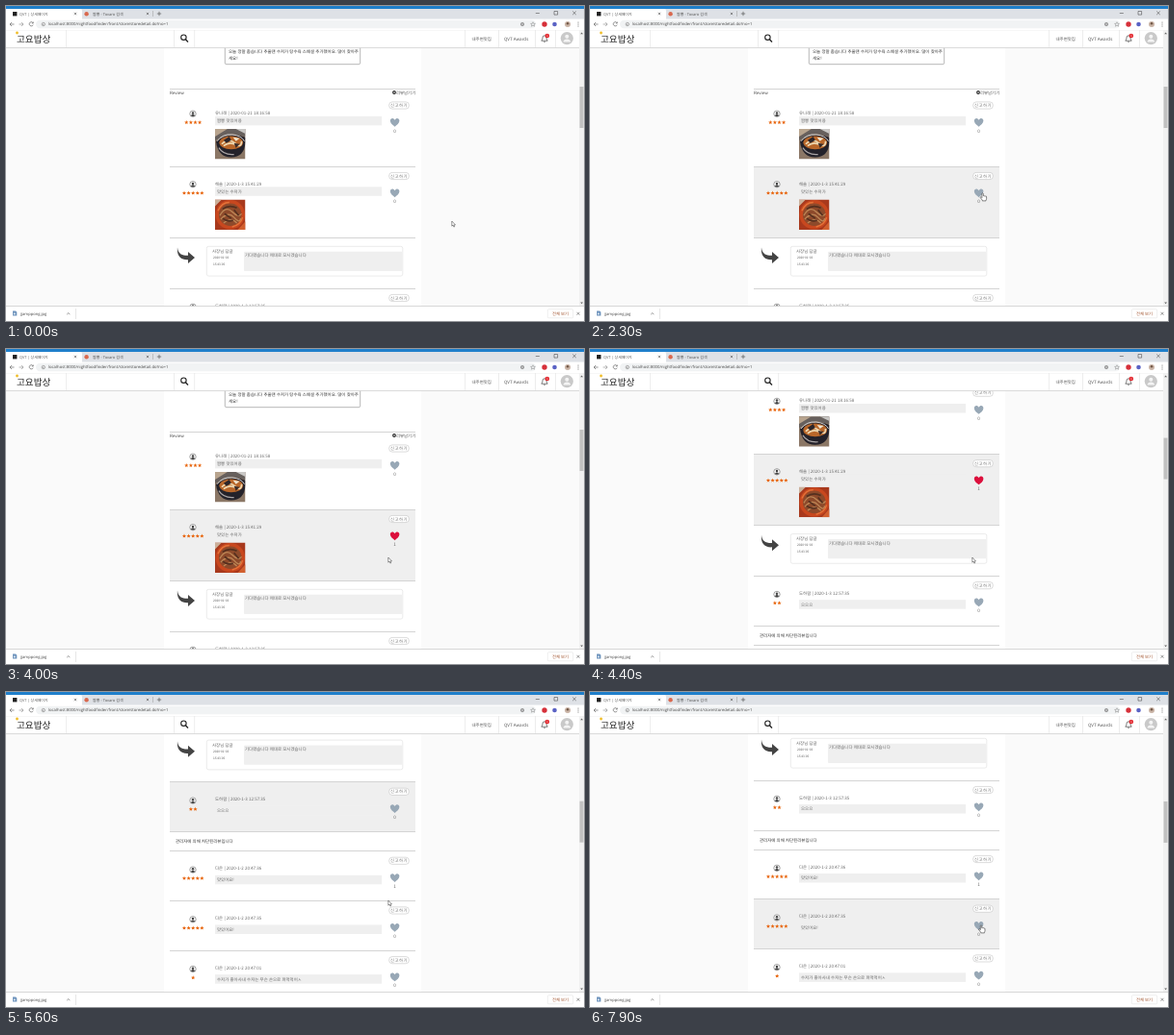
An HTML page for the animation above (8 s loop, 600x328 px).

```html
<!DOCTYPE html>
<html lang="ko">
<head>
<meta charset="utf-8">
<title>Review page</title>
<style>
  html, body { margin: 0; width: 100%; height: 100%; overflow: hidden; background: #fff; }
  svg { display: block; width: 600px; height: 328px; }
  svg svg { width: 31.5px; height: 31.5px; }
  text { font-family: "Noto Sans CJK KR", "Noto Sans CJK", "Noto Sans", sans-serif; white-space: pre; text-rendering: geometricPrecision; }
  .ui { font-family: "Open Sans", "Noto Sans CJK KR", "Noto Sans CJK", sans-serif; }
</style>
</head>
<body>
<svg id="stage" viewBox="0 0 600 328" xmlns="http://www.w3.org/2000/svg"></svg>
<script>
const LOOP = 8000;
const GREY = '#efefef', HEART = '#98a8b6', RED = '#dc0f3c';

const rect = (x, y, w, h, fill, extra = '') =>
  `<rect x="${x}" y="${y}" width="${w}" height="${h}" fill="${fill}" ${extra}/>`;
const circle = (x, y, r, fill, extra = '') =>
  `<circle cx="${x}" cy="${y}" r="${r}" fill="${fill}" ${extra}/>`;
const stroke = (d, color, width = 0.6, extra = '') =>
  `<path d="${d}" fill="none" stroke="${color}" stroke-width="${width}" ${extra}/>`;
const shape = (d, fill, extra = '') => `<path d="${d}" fill="${fill}" ${extra}/>`;
// y is the vertical middle of the line of text
const label = (x, y, str, size = 4.45, fill = '#666', extra = '') =>
  `<text x="${x}" y="${y + size * 0.37}" font-size="${size}" fill="${fill}" ${extra}>${str}</text>`;
const rule = y => rect(170, y - 0.5, 255, 1, '#d4d4d4', 'shape-rendering="crispEdges"');
const cross = (x, y, r, color, w = 0.6) =>
  stroke(`M${x - r} ${y - r}l${2 * r} ${2 * r}m0 ${-2 * r}l${-2 * r} ${2 * r}`, color, w);

const rows = [
  { y: 93.5, h: 73.5, who: '유나래', when: '2020-01-21 18:16:58', text: '짬뽕 맛있어용', stars: 4, photo: bowlPhoto },
  { y: 167, h: 74, who: '해솔', when: '2020-1-3 15:41:29', text: '맛있는 수저가', stars: 5, photo: soupPhoto, liked: true },
  { y: 294, h: 52, who: '도하람', when: '2020-1-3 12:57:35', text: '으으으', stars: 2 },
  { y: 366, h: 51.7, who: '다온', when: '2020-1-2 20:47:36', text: '맛있어요!', stars: 5, count: 1 },
  { y: 417.7, h: 51.7, who: '다온', when: '2020-1-2 20:47:35', text: '맛있어요!', stars: 5 },
  { y: 469.4, h: 52, who: '다온', when: '2020-1-2 20:47:01', text: '수저가 좋아사내 수저는 무슨 손으로 퍼먹먹어ㅅ', stars: 1 },
];

function star(cx, cy, r) {
  const pts = Array.from({ length: 10 }, (_, i) => {
    const a = i * Math.PI / 5, k = i % 2 ? r * 0.45 : r;
    return `${(cx + k * Math.sin(a)).toFixed(2)},${(cy - k * Math.cos(a)).toFixed(2)}`;
  });
  return `<polygon points="${pts.join(' ')}" fill="#e8650c"/>`;
}

const photo = (y, body) =>
  `<svg x="217" y="${y}" width="31.5" height="31.5" viewBox="0 0 32 32">${body}</svg>`;

function bowlPhoto(y) {
  return photo(y,
    rect(0, 0, 32, 32, '#8b7766') + shape('M0 0H32V8L18 5L0 12Z', '#67605d') +
    shape('M0 0H13L0 8Z', '#b8a48e') + shape('M22 0H32V5Z', '#c9c8c6') +
    shape('M1 13Q3 30 17 30T32 14V9Q17 2 1 13Z', '#24222a') +
    stroke('M2 13Q8 5 18 6T31 13', '#d7d5d4', 1) + stroke('M4 20Q9 28 20 27', '#a9a4a5', 1.2) +
    `<ellipse cx="17" cy="14.5" rx="12.5" ry="7" fill="#b9672a"/>` +
    stroke('M7 16Q14 9 21 15T28 13M9 18Q16 12 24 18', '#eed9b2', 1.7) +
    shape('M9 12L15 8L17 12L12 15Z', '#2c262a') + shape('M20 15L26 16L22 20Z', '#3a2924') +
    shape('M19 9L26 10L22 13Z', '#f1e6d0'));
}

function soupPhoto(y) {
  return photo(y,
    rect(0, 0, 32, 32, '#a8391d') + circle(16, 16, 15.5, '#c8481f') + circle(16, 16, 12, '#8d4a2b') +
    stroke('M5 17Q11 6 18 13T28 15M6 21Q14 12 20 19T27 20M9 25Q17 18 23 25', '#bd8756', 1.3) +
    stroke('M8 10Q15 5 23 9M10 15L17 20M20 11L25 17M8 20Q13 24 19 22', '#55301f', 1.7) +
    stroke('M3 12Q7 3 15 3M18 29Q27 27 29 19', '#e2743a', 1.4) +
    shape('M0 0H7L0 7Z', '#cbb09a') + shape('M24 32L32 23V32Z', '#d2602f'));
}

function user(x, y) {
  return circle(x, y, 3.2, '#fff', 'stroke="#666" stroke-width=".6"') +
    circle(x, y - 0.8, 1.25, '#444') + shape(`M${x - 2.2} ${y + 2.1}Q${x} ${y - 0.8} ${x + 2.2} ${y + 2.1}Q${x} ${y + 3.6} ${x - 2.2} ${y + 2.1}Z`, '#444');
}

function heart(x, y, id) {
  return shape(`M${x} ${y + 4.6}C${x - 2} ${y + 2.8} ${x - 4.8} ${y + 1} ${x - 4.8} ${y - 1.6}C${x - 4.8} ${y - 4.8} ${x - 1.2} ${y - 5} ${x} ${y - 2.4}C${x + 1.2} ${y - 5} ${x + 4.8} ${y - 4.8} ${x + 4.8} ${y - 1.6}C${x + 4.8} ${y + 1} ${x + 2} ${y + 2.8} ${x} ${y + 4.6}Z`, HEART, id);
}

function review(r) {
  const { y } = r, gap = r.photo ? 0 : 0.6;
  const boxY = y + (r.photo ? 21.3 : 25);
  let out = rule(y + r.h);
  out += user(194, y + 18.7 + gap);
  for (let i = 0; i < r.stars; i++) out += star(194.2 + (i - (r.stars - 1) / 2) * 4.6, y + 27.7 + gap, 2.2);
  out += label(217, y + 18, `${r.who} | ${r.when}`);
  out += rect(217, boxY, 173, 9.5, GREY) + label(219, boxY + 4.8, r.text);
  if (r.photo) out += r.photo(y + 34.5);
  out += rect(397.7, y + 6.4, 20.6, 7.2, '#fff', 'rx="3.2" stroke="#b8b8b8" stroke-width=".5"');
  out += label(408, y + 10, '신고하기', 4.4, '#777', 'text-anchor="middle" letter-spacing=".4"');
  out += heart(403.6, y + 27.6, r.liked ? 'id="heart"' : '');
  out += label(403.6, y + 36.5, r.count || 0, 4.6, '#666', 'text-anchor="middle"' + (r.liked ? ' id="count"' : ''));
  return out;
}

function pageContent() {
  return rect(227.3, 30, 140.4, 30.7, '#fff', 'rx="1.5" stroke="#888" stroke-width=".6"') +
    label(231, 47, '오늘 정말 춥습니다 추울땐 수저가 탕수육 스페셜 추가했어요. 많이 찾아주', 4.45, '#333') +
    label(231, 54, '세요!', 4.45, '#333') +
    rule(86.2) + label(170, 90, 'Review', 4.45, '#444') +
    circle(403, 90, 1.9, '#222') + stroke('M402 90h2m-1-1v2', '#fff', 0.5) +
    label(405, 90, '리뷰남기기', 4.4, '#555') +
    rows.map(review).join('') +
    shape('M178 251.5C178.5 257.5 182 260 189 259.8V256L196 262L189 268V264.2C181 264.6 177 259.5 178 251.5Z', '#444') +
    rect(208.3, 250.3, 203.5, 30.8, '#fff', 'rx="2" stroke="#ddd" stroke-width=".6"') +
    label(214, 255.5, '사장님 답글') +
    label(215, 262, '2020-01-03', 3.15, '#555') + label(215, 269, '15:43:05', 3.15, '#555') +
    rect(247, 255.8, 164.5, 20.2, GREY, 'rx="1"') +
    label(248, 259.8, '기다렸습니다 제대로 모시겠습니다') +
    rule(294) + label(176, 356, '관리자에 의해 차단된리뷰입니다', 4.45, '#333') + rule(366);
}

function browserTop() {
  return rect(0, 0, 600, 14, '#dee1e6') + rect(0, 0, 600, 3, '#1f7fcb') +
    shape('M0 14V3H77Q79 3 79 5V14Z', '#fff') + rect(7, 6, 4.4, 4.4, '#222') +
    label(14, 8.2, 'QVT | 상세페이지', 3.9, '#555', 'class="ui"') + cross(72, 8, 1.2, '#555') +
    circle(83.6, 8.2, 2.2, '#d9694f') +
    label(90, 8.2, '짬뽕 - Tovaro 검색', 4, '#555', 'class="ui"') + cross(147, 8, 1.2, '#555') +
    rect(152, 5, 0.5, 6, '#999') + stroke('M156.8 8h4.4m-2.2-2.2v4.4', '#444') +
    stroke('M549.8 7.5h4M569 5.5h3.6v3.6H569Z', '#333', 0.5) + cross(590, 7.3, 1.8, '#333', 0.5) +
    rect(0, 13.5, 600, 11.5, '#fff') + rect(31, 14.8, 519, 8.4, '#f1f3f4', 'rx="4.2"') +
    stroke('M8.5 19H4m2-2l-2 2l2 2', '#555') + stroke('M13.5 19H18m-2-2l2 2l-2 2', '#888') +
    stroke('M28 17.6A2.1 2.1 0 1 0 28.2 19.6M28.3 16.5v1.5h-1.6', '#555') +
    circle(38.8, 19, 1.7, 'none', 'stroke="#666" stroke-width=".5"') + rect(38.5, 18.7, 0.6, 1.3, '#666') +
    label(44, 18.8, 'localhost:8000/nightfoodfinder/front/store/storedetail.do?no=1', 4.24, '#444', 'class="ui"') +
    circle(536, 19, 1.7, 'none', 'stroke="#666" stroke-width=".6"') + stroke('M535 19h2m-1-1v2', '#666', 0.5) +
    stroke('M547 16.7l.7 1.6l1.7.1l-1.3 1.1l.5 1.7l-1.6-1l-1.6 1l.5-1.7l-1.3-1.1l1.7-.1Z', '#666', 0.4) +
    circle(559, 19, 2.7, '#d6303a') + circle(569.5, 19, 2.3, '#5a62c4') +
    circle(583, 19, 3, '#c9b3a5') + circle(583, 18.2, 1.2, '#715746') +
    [17, 19, 21].map(y => circle(594, y, 0.5, '#555')).join('');
}

function siteHeader() {
  const dividers = [62.3, 174, 195.5, 476.3, 511, 549, 570].map(x => rect(x, 25, 0.6, 18, '#e2e2e2')).join('');
  return rect(0, 25, 595, 18.5, '#fff') + rect(0, 24.6, 600, 0.6, '#d5d5d5') + rect(0, 43, 595, 0.8, '#d2d2d2') + dividers +
    circle(11.5, 28, 1.4, '#f0bd28') +
    label(11, 34.5, '고요밥상', 9.6, '#222', 'font-weight="500"') +
    circle(184.4, 32.7, 2.7, 'none', 'stroke="#222" stroke-width="1.1"') + stroke('M186.4 34.7l2.6 2.8', '#222', 1.3) +
    label(483.5, 34, '내주변맛집', 4.45, '#555') + label(517, 34, 'QVT Awards', 4.5, '#555') +
    stroke('M555.8 36.2Q557 35 557 33Q557 30.8 559 30.8T561 33Q561 35 562.2 36.2ZM558.2 37.3h1.6', '#444', 0.7) +
    circle(561.8, 31, 2.3, '#e3242b') + label(561.8, 31, '1', 3.2, '#fff', 'text-anchor="middle"') +
    circle(582.3, 33.6, 6.6, '#c9c9c9') + circle(582.3, 31.7, 2, '#f4f4f4') +
    shape('M578.5 37.6Q578.8 34.4 582.3 34.4T586.1 37.6Z', '#f4f4f4');
}

function browserBottom() {
  return rect(0, 312.3, 600, 15.7, '#fff') + rect(0, 312.2, 600, 0.7, '#c8c8c8') +
    shape('M7 317.5h3l1.3 1.3v3.7H7Z', '#6f94bd') + circle(8.8, 320.5, 0.9, '#e4edf5') +
    label(15, 320.7, 'jjamppong.jpg', 4.1, '#444', 'class="ui"') +
    stroke('M63.2 321.2l1.6-1.6l1.6 1.6', '#555') + rect(72, 315, 0.5, 11, '#ccc') +
    rect(562.3, 315.8, 26.4, 9, '#fff', 'rx="1" stroke="#ddd" stroke-width=".5"') +
    label(575.5, 320.3, '전체 보기', 4.3, '#a0522d', 'text-anchor="middle"') + cross(594, 320.3, 1.5, '#555');
}

const stage = document.getElementById('stage');
stage.innerHTML =
  rect(0, 0, 600, 328, '#fafafa') + rect(164, 25, 267, 290, '#fff') +
  `<g id="page">${rect(170, 0, 255, 0, GREY, 'id="hover"')}${pageContent()}</g>` +
  siteHeader() + browserTop() +
  rect(595, 25, 5, 288, '#f1f1f1') + rect(595.5, 84, 4, 43, '#c1c1c1', 'id="thumb"') +
  shape('M596.2 29.2l1.4-1.8l1.4 1.8Z', '#666') + shape('M596.2 308.5l1.4 1.8l1.4-1.8Z', '#666') +
  browserBottom() +
  `<g id="arrow">${shape('M0 0V5.2L1.2 4.1L2.1 6.1L2.9 5.7L2.1 3.9H3.7Z', '#fff', 'stroke="#333" stroke-width=".5"')}</g>` +
  `<g id="hand">${shape('M-.7 .3Q0-.6 .7 .3V2.7Q1.4 2.2 1.8 2.9Q2.5 2.4 3 3.1Q4 2.8 4 3.8V5.6Q4 6.4 3.4 7.2V7.9H-.3V7.2L-2.4 4.5Q-2.4 3.4-1.4 3.9L-.7 4.6Z', '#fff', 'stroke="#222" stroke-width=".55"')}</g>`;

const el = Object.fromEntries(['page', 'hover', 'thumb', 'heart', 'count', 'arrow', 'hand']
  .map(id => [id, document.getElementById(id)]));

const scrolls = [
  { start: 4163, end: 4664, by: 125 },
  { start: 5107, end: 5650, by: 77 },
];
const moves = [
  { start: 700, end: 1800, from: [462.8, 224], to: [407.6, 195] },
  { start: 3100, end: 3700, from: [407.6, 195], to: [396.8, 217] },
  { start: 5750, end: 6300, from: [396.8, 217], to: [403.8, 278.5] },
  { start: 6900, end: 7500, from: [403.8, 278.5], to: [406, 243] },
];
const LIKE_AT = 2900;

const ease = (t, { start, end }) => {
  const p = Math.min(1, Math.max(0, (t - start) / (end - start)));
  return p * p * (3 - 2 * p);
};

function cursorAt(t) {
  const m = moves.filter(s => t >= s.start).pop() || moves[0];
  const p = ease(t, m);
  return m.from.map((v, i) => v + (m.to[i] - v) * p);
}

function draw(t) {
  const scroll = scrolls.reduce((sum, s) => sum + s.by * ease(t, s), 0);
  // hover only refreshes once a scroll has come to rest
  const settled = scrolls.reduce((sum, s) => sum + (t >= s.end ? s.by : 0), 0);
  const [x, y] = cursorAt(t);
  const pageY = y + settled;
  const row = x > 170 && x < 425 && rows.find(r => pageY >= r.y && pageY < r.y + r.h);
  const onHeart = row && Math.abs(x - 403.6) < 5 && Math.abs(pageY - row.y - 27.6) < 5;
  const onButton = row && x > 397.7 && x < 418.3 && Math.abs(pageY - row.y - 10) < 3.6;
  const hand = onHeart || onButton;
  const liked = t >= LIKE_AT;

  el.page.setAttribute('transform', `translate(0 ${-scroll})`);
  el.thumb.setAttribute('y', 84 + scroll * 0.148);
  el.hover.setAttribute('y', row ? row.y : 0);
  el.hover.setAttribute('height', row ? row.h : 0);
  el.heart.setAttribute('fill', liked ? RED : HEART);
  el.count.textContent = liked ? 1 : 0;
  for (const [node, on] of [[el.arrow, !hand], [el.hand, hand]]) {
    node.setAttribute('transform', `translate(${x} ${y})`);
    node.setAttribute('display', on ? 'inline' : 'none');
  }
}

const begin = performance.now();
function tick() {
  draw((performance.now() - begin) % LOOP);
  requestAnimationFrame(tick);
}
tick();
</script>
</body>
</html>
```
